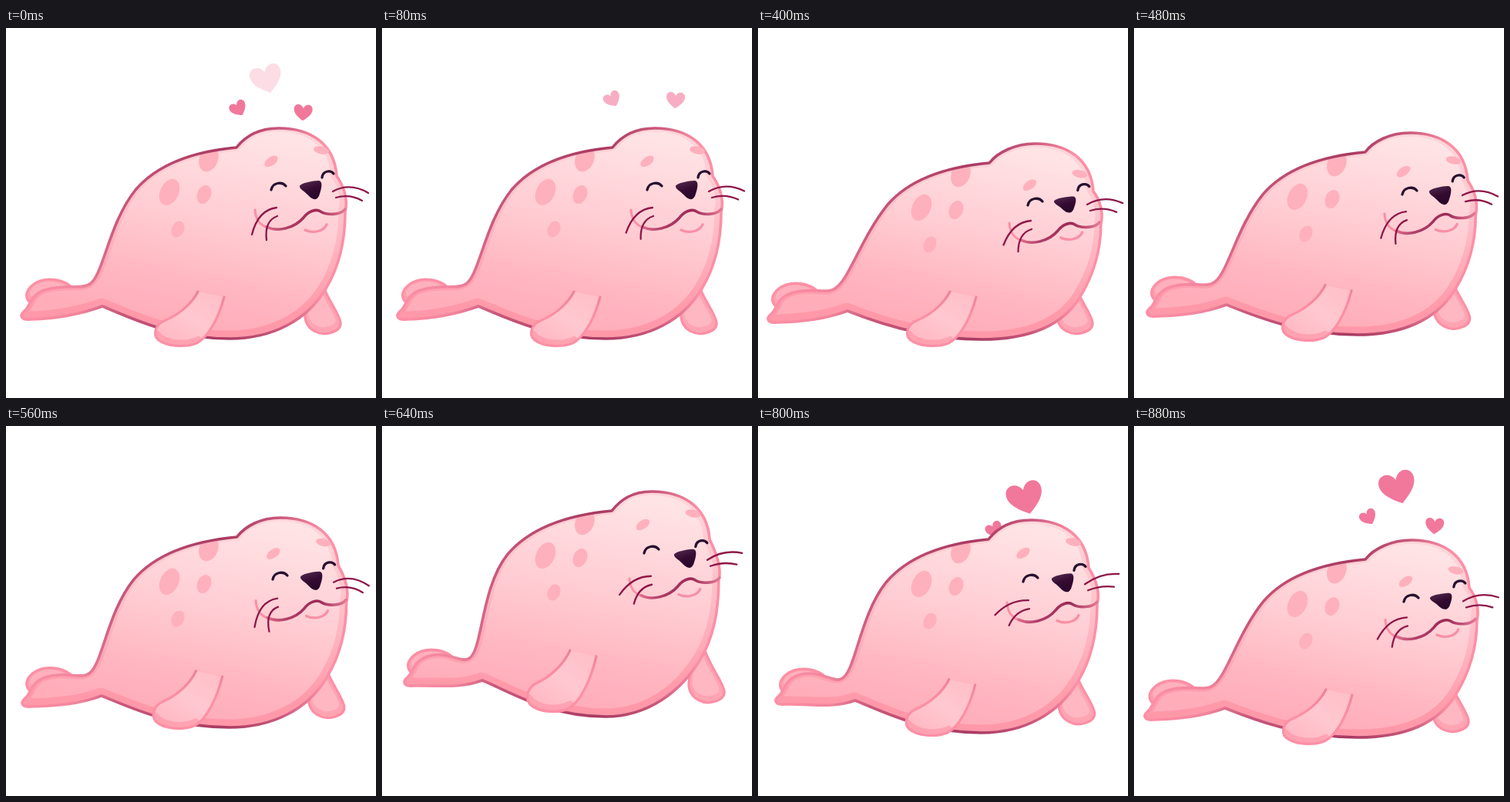
Recreate the animation shown at these times as an HTML page with a canvas. Size 480 px wide and 480 px high, loop 0.96 s.

```html
<!DOCTYPE html>
<html lang="en">
<head>
<meta charset="utf-8">
<title>Happy seal</title>
<style>
html, body { margin: 0; width: 100%; height: 100%; overflow: hidden; background: #fff; }
canvas { display: block; width: 480px; height: 480px; }
</style>
</head>
<body>
<canvas id="stage" width="480" height="480"></canvas>
<script>
const ctx = document.getElementById('stage').getContext('2d');
const STEP = 80, STEPS = 12;
const EDGE = '#fd8fa5', DARK = '#8e1748', SPOT = '#ffb0bd';

// top: back and head, low: belly, lean: head sideways, root/tip: tail, feet: flippers
const pose = (top, low, lean, root, tip, feet, swing) => ({ top, low, lean, root, tip, feet, swing });
const rest = swing => pose(0, 0, 0, [0, 0], [0, 0], 0, swing);
const POSES = [
  rest(0), rest(4), rest(7), rest(8), rest(8),
  pose(20, 1, 6, [-9, 6], [-7, 4], 0, 6),
  pose(6, -5, 4, [-5, -2], [-3, -4], -7, 1),
  pose(-11, -12, 2, [-1, -11], [1, -14], -20, -4),
  pose(-45, -26, -4, [5, -31], [9, -41], -42, 17),
  pose(-31, -12, -4, [4, -15], [9, -43], -24, 34),
  pose(-8, -5, 0, [1, -5], [3, -17], -11, 24),
  pose(18, 1, 6, [-7, 5], [-6, 3], 0, 11)
];

const BODY_START = ['crease', 299, 155];
const BODY = [
  ['crease', 245, 160, 'back', 198, 175, 'back', 168, 210],
  ['back', 132, 255, 'root', 126, 325, 'root', 107, 333],
  ['root', 98, 339, 'tip', 75, 332, 'tip', 50, 340],
  ['tip', 30, 347, 'tip', 32, 361, 'tip', 24, 367],
  ['tip', 16, 374, 'tip', 21, 379, 'tip', 32, 378],
  ['tip', 65, 377, 'root', 95, 372, 'root', 125, 361],
  ['root', 160, 375, 'low', 215, 403, 'low', 290, 403],
  ['low', 345, 403, 'side', 390, 380, 'side', 415, 338],
  ['side', 432, 310, 'jaw', 440, 275, 'jaw', 440, 238],
  ['jaw', 444, 222, 'jaw', 438, 205, 'face', 429, 192],
  ['face', 426, 150, 'face', 395, 130, 'face', 354, 130],
  ['face', 328, 130, 'crease', 310, 141, 'crease', 299, 155]
];

function offsets(p) {
  const mid = (a, b) => (a + b) / 2;
  return {
    crease: [p.lean * .2, p.top],
    back: [p.feet * .12, p.top * .97],
    root: p.root,
    tip: p.tip,
    lobe: [mid(p.root[0], p.tip[0]), mid(p.root[1], p.tip[1])],
    low: [0, p.low],
    side: [p.lean / 2, mid(p.top, p.low)],
    jaw: [p.lean * .8, p.top * .83],
    muzzle: [p.lean * .5, p.top * .85],
    chin: [p.lean * .8, mid(p.top, p.feet)],
    face: [p.lean, p.top],
    brow: [p.lean * 1.4, p.top + 1.8 * Math.max(0, p.lean)]
  };
}

function gradient(x0, y0, x1, y1, ...stops) {
  const g = ctx.createLinearGradient(x0, y0, x1, y1);
  stops.forEach(([at, color]) => g.addColorStop(at, color));
  return g;
}

function line(path, color, width) {
  ctx.strokeStyle = color;
  ctx.lineWidth = width;
  ctx.stroke(typeof path === 'string' ? new Path2D(path) : path);
}

function shape(path, fill) {
  ctx.fillStyle = fill;
  ctx.fill(path);
}

function shifted([x, y], draw) {
  ctx.save();
  ctx.translate(x, y);
  draw();
  ctx.restore();
}

// Soft band inside the outline, wider towards the bottom
function shaded(path, color, width) {
  ctx.save();
  ctx.clip(path);
  shifted([-1, -3], () => line(path, color, width));
  ctx.restore();
}

function spot(x, y, rx, ry, degrees) {
  ctx.beginPath();
  ctx.ellipse(x, y, rx, ry, degrees * Math.PI / 180, 0, Math.PI * 2);
  ctx.fillStyle = SPOT;
  ctx.fill();
}

const HEART = new Path2D('M0 .95C-.5 .6-1 .2-1-.3C-1-.9-.25-1 0-.4C.25-1 1-.9 1-.3C1 .2 .5 .6 0 .95Z');
function heart(x, y, size, degrees, alpha) {
  ctx.save();
  ctx.globalAlpha = alpha;
  ctx.translate(x, y);
  ctx.rotate(degrees * Math.PI / 180);
  ctx.scale(size, size);
  shape(HEART, '#f1779b');
  ctx.restore();
}

function hearts(step) {
  const age = (step + 3) % STEPS;
  if (age > 5) return;
  const d = age - 2;
  if (age < 4) heart(351 - 4.4 * age, 106 - 13.6 * age, d > 0 ? 20.5 : 23.5, -16, d > 0 ? .25 : 1);
  const alpha = [1, 1, 1, 1, .6, .2][age];
  heart(304 - 2.6 * d, 118 - 15 * d + d * d, 11, -30, alpha);
  heart(390 - 4.6 * d, 129 - 22 * d + 2 * d * d, 12, 4, alpha);
}

function bodyPath(off) {
  const place = (g, x, y) => [x + off[g][0], y + off[g][1]];
  const path = new Path2D();
  path.moveTo(...place(...BODY_START));
  for (const c of BODY) {
    path.bezierCurveTo(...place(...c.slice(0, 3)), ...place(...c.slice(3, 6)), ...place(...c.slice(6)));
  }
  path.closePath();
  return path;
}

const LOBE = new Path2D('M90 342C78 324 50 322 35 333C25 341 24 350 32 357L62 352Z');
const FAR_FLIPPER = new Path2D('M404 316C415 352 432 368 434 382C435 395 412 400 402 394C392 390 387 380 388 371L392 330Z');
const FLIPPER = new Path2D('M249 342C241 358 224 372 207 379C194 384 190 397 197 404C207 413 232 415 247 409C262 402 276 376 283 349');

function body(p, off) {
  const path = bodyPath(off);
  shape(path, gradient(330, 140 + p.top, 280, 395 + p.low,
    [0, '#ffe3e5'], [.45, '#ffcdd3'], [.8, '#ffb6c0'], [1, '#ffadb9']));
  shaded(path, gradient(0, 150 + p.top, 0, 370 + p.low,
    [0, 'rgba(255,190,200,.4)'], [.5, 'rgba(255,165,180,.45)'], [1, 'rgba(255,145,163,.75)']), 15);
  ctx.save();
  ctx.clip(path);
  shifted([0, p.top], () => {
    spot(263, 170, 12, 17, 22);
    spot(212, 213, 12, 18, 25);
    spot(257, 216, 9, 12.5, 22);
    spot(223, 261, 8, 11, 25);
  });
  ctx.restore();
  line(path, gradient(20, 0, 440, 0,
    [0, EDGE], [.18, '#f0849d'], [.3, '#c9587b'], [.62, '#a83a62'], [.8, '#c9587b'], [.93, EDGE], [1, EDGE]), 3.6);
}

function nearFlipper(p) {
  shifted([p.feet * .12, 413 + p.feet], () => {
    ctx.scale(1, 1 - p.feet * .003);
    ctx.translate(0, -413);
    shape(FLIPPER, gradient(265, 345, 222, 412, [0, '#ffc0c9'], [.5, '#ffc8d0'], [1, '#ffb9c4']));
    ctx.save();
    ctx.clip(FLIPPER);
    line('M195 396C207 411 234 411 249 404', 'rgba(255,145,163,.6)', 8);
    ctx.restore();
    line(FLIPPER, gradient(0, 342, 0, 375, [0, '#ee819b'], [1, EDGE]), 3.2);
  });
}

function whisker(x, y, ctrl, tip, degrees) {
  const turn = ([dx, dy], deg) => {
    const a = deg * Math.PI / 180, c = Math.cos(a), s = Math.sin(a);
    return [x + dx * c - dy * s, y + dx * s + dy * c];
  };
  ctx.beginPath();
  ctx.moveTo(x, y);
  ctx.quadraticCurveTo(...turn(ctrl, degrees * .4), ...turn(tip, degrees));
  ctx.strokeStyle = DARK;
  ctx.lineWidth = 2.3;
  ctx.stroke();
}

const NOSE = new Path2D('M381 205C380 200 400 197 406 197C411 198 410 206 406 217C403 223 398 222 393 217C388 211 382 209 381 205Z');

function face(p, off) {
  const ink = '#28102f';
  shifted(off.brow, () => {
    spot(344, 173, 10, 5.5, -35);
    spot(409, 158.5, 10, 5, 12);
  });
  shifted(off.face, () => line('M344 210C346 200 358 199 363 205', ink, 3.3));
  shifted(off.jaw, () => line('M410 194C411 185 421 184 425 189', ink, 3.3));
  shifted(off.chin, () => line('M388 262C398 267 412 264 416 255', '#f88fa5', 3.2));
  shifted(off.muzzle, () => {
    line('M323 236C324 250 330 256 340 259', EDGE, 3.2);
    line('M338 258C352 265 374 260 386 246C392 238 402 234 408 238C416 243 434 243 440 235',
      gradient(336, 0, 441, 0, [0, '#e0708e'], [.25, '#b03f68'], [.65, '#9c2855'], [1, '#e57c97']), 3.6);
    shifted([0, p.top > 0 ? 212 : 210], () => {
      ctx.scale(1, p.top > 10 ? .87 : 1);
      ctx.translate(0, -209);
      shape(NOSE, gradient(392, 198, 400, 221, [0, '#4d2348'], [.45, '#350b32'], [1, '#28062a']));
    });
    whisker(351, 233, [-24, 3], [-32, 35], p.swing);
    whisker(352, 244, [-17, 6], [-14, 31], p.swing * 1.1);
    whisker(424, 212, [22, -12], [46, 2], -p.swing * .8);
    whisker(428, 220, [18, -5], [34, 4], -p.swing * .6);
  });
}

function backPart(path, fill, offset) {
  shifted(offset, () => {
    shape(path, fill);
    shaded(path, 'rgba(255,145,163,.5)', 11);
    line(path, EDGE, 3.2);
  });
}

function draw(step) {
  const p = POSES[step], off = offsets(p);
  ctx.fillStyle = '#fff';
  ctx.fillRect(0, 0, 480, 480);
  ctx.lineCap = ctx.lineJoin = 'round';
  hearts(step);
  backPart(LOBE, '#ffb0bc', off.lobe);
  backPart(FAR_FLIPPER, '#ffb7c2', [-p.feet * .24, p.feet * .9]);
  body(p, off);
  nearFlipper(p);
  face(p, off);
}

function tick() {
  draw(Math.floor(performance.now() / STEP) % STEPS);
  requestAnimationFrame(tick);
}
tick();
</script>
</body>
</html>
```
